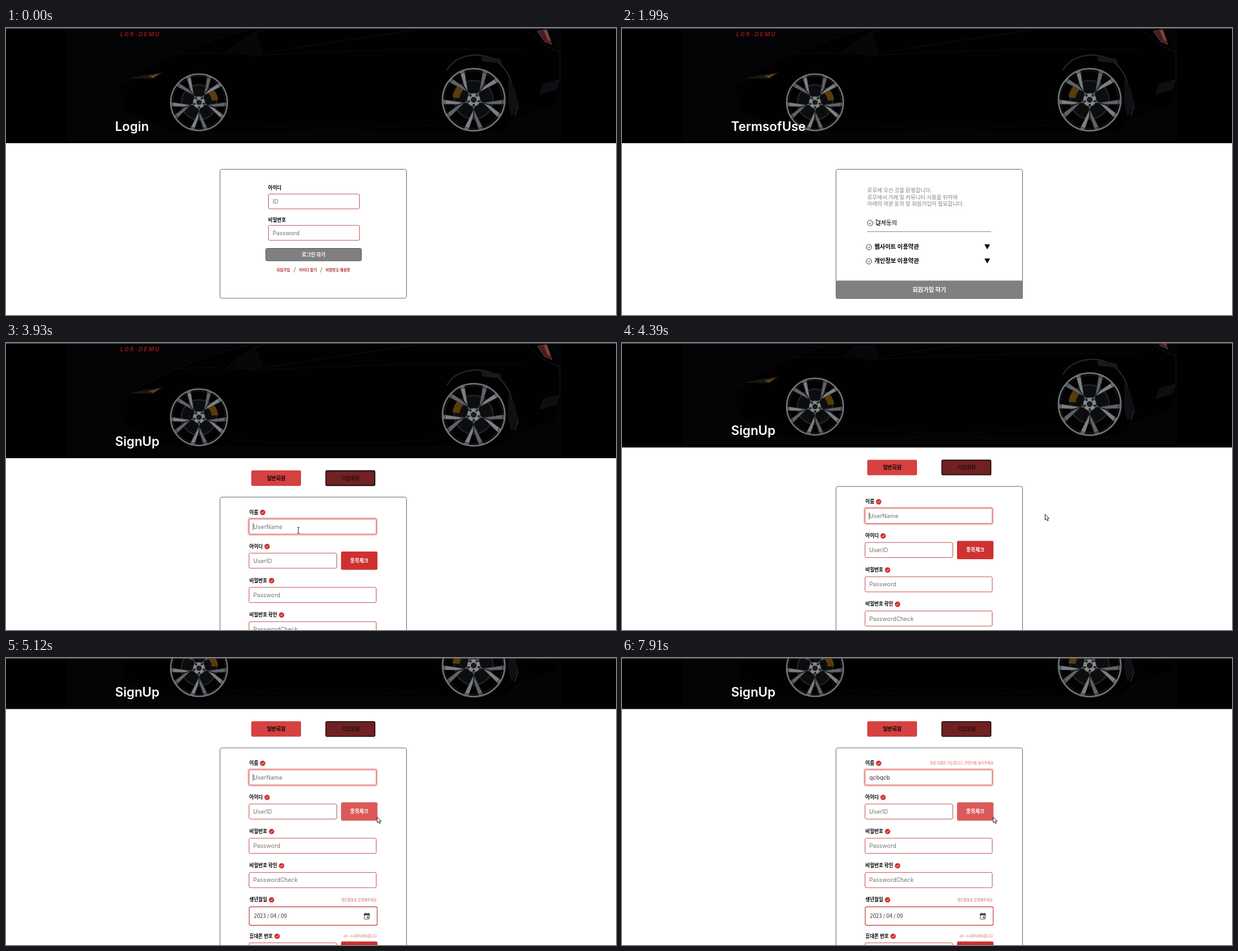
An HTML page with a canvas for the animation above (8000 ms loop, 945 by 446 pixels).

```html
<!DOCTYPE html>
<html lang="ko">
<head>
<meta charset="utf-8">
<title>Sign up flow</title>
<style>
html, body { margin: 0; width: 100%; height: 100%; overflow: hidden; background: #fff; }
canvas { display: block; width: 945px; height: 446px; }
</style>
</head>
<body>
<canvas id="stage" width="945" height="446"></canvas>
<script>
const ctx = document.getElementById('stage').getContext('2d');
const LOOP = 8000, SCROLL = 99.7;
const KR = '"Noto Sans CJK KR", "Noto Sans CJK", sans-serif';
const INTER = 'Inter, "Noto Sans CJK KR", sans-serif';
const RED = '#cf3131', GREY = '#808080', EDGE = '#c9504e', HINT = '#757575';

// Pointer path: time, x, y
const PATH = [
  [250, 637, 398], [720, 446, 372], [910, 446, 371], [1120, 432, 375], [1260, 432, 375],
  [1600, 850, 422], [1990, 394, 297], [2140, 394, 297], [2600, 440, 396], [3130, 440, 396],
  [3560, 449, 250], [3930, 453, 291], [4000, 453, 291], [4530, 697, 261], [4780, 794, 365],
  [5120, 575, 247]
];

// Field contents: time, text, warning visible
const TYPED = [
  [0, '', false], [5980, 'q', true], [6510, '', false], [6970, 'qcb', true],
  [7110, 'qcbq', true], [7310, 'qcbqc', true], [7380, 'qcbqcb', true]
];

const smooth = p => p * p * (3 - 2 * p);
const clamp = p => Math.max(0, Math.min(1, p));
const inside = (p, x0, y0, x1, y1) => p.x >= x0 && p.x <= x1 && p.y >= y0 && p.y <= y1;

function pointer(t) {
  const i = PATH.findIndex(k => k[0] > t);
  if (i === 0) return null;
  if (i < 0) return { x: 575, y: 247 };
  const [t0, x0, y0] = PATH[i - 1], [t1, x1, y1] = PATH[i];
  const p = smooth((t - t0) / (t1 - t0));
  return { x: x0 + (x1 - x0) * p, y: y0 + (y1 - y0) * p };
}

// Text placed by its vertical centre
function text(s, x, cy, size, color = '#000', weight = 700, align = 'left', family = KR) {
  ctx.font = `${weight} ${size}px ${family}`;
  ctx.fillStyle = color;
  ctx.textAlign = align;
  ctx.fillText(s, x, cy + size * 0.37);
  return ctx.measureText(s).width;
}

function box(x0, y0, x1, y1, r, fill, stroke, width = 1) {
  ctx.beginPath();
  ctx.roundRect(x0, y0, x1 - x0, y1 - y0, r);
  if (fill) { ctx.fillStyle = fill; ctx.fill(); }
  if (stroke) { ctx.strokeStyle = stroke; ctx.lineWidth = width; ctx.stroke(); }
}

function shape(points, fill, stroke, width = 1) {
  ctx.beginPath();
  points.forEach(([x, y]) => ctx.lineTo(x, y));
  ctx.closePath();
  if (fill) { ctx.fillStyle = fill; ctx.fill(); }
  if (stroke) { ctx.strokeStyle = stroke; ctx.lineWidth = width; ctx.stroke(); }
}

function curve(d, stroke, width) {
  ctx.strokeStyle = stroke;
  ctx.lineWidth = width;
  ctx.stroke(new Path2D(d));
}

function disc(x, y, r, fill, stroke, width = 1) {
  ctx.beginPath();
  ctx.arc(x, y, r, 0, Math.PI * 2);
  if (fill) { ctx.fillStyle = fill; ctx.fill(); }
  if (stroke) { ctx.strokeStyle = stroke; ctx.lineWidth = width; ctx.stroke(); }
}

function check(x, y, on, r = 4.2) {
  disc(x, y, on ? r + 0.3 : r, on ? RED : null, on ? null : '#222', 0.8);
  curve(`M${x - 2} ${y}l1.4 1.5 2.7-2.9`, on ? '#fff' : '#222', 0.8);
}

function input(x0, y0, x1, y1, hint, focus) {
  if (focus) box(x0 - 1, y0 - 1, x1 + 1, y1 + 1, 3, null, 'rgba(207,49,49,.28)', 3);
  box(x0, y0, x1, y1, 2, '#fff', focus ? '#d4504c' : EDGE, 0.9);
  if (hint) text(hint, x0 + 6.5, (y0 + y1) / 2, 9, HINT, 400, 'left', INTER);
}

function wheel(x, y, r, caliper) {
  const at = (d, a) => [d * r * Math.cos(a), d * r * Math.sin(a)];
  ctx.save();
  ctx.translate(x, y);
  disc(0, 0, r * 1.06, '#020203');
  disc(0, 0, r * 0.6, '#0c0d0f', '#222427', 2);
  ctx.beginPath();
  ctx.arc(0, 0, r * 0.55, caliper - 0.38, caliper + 0.38);
  ctx.strokeStyle = '#5a3b0d';
  ctx.lineWidth = r * 0.22;
  ctx.stroke();
  for (let i = 0; i < 5; i++) {
    const a = Math.PI / 2 + i * Math.PI * 0.4;
    for (const s of [-1, 1]) {
      shape([at(0.16, a - s * 0.5), at(0.5, a + s * 0.19), at(0.94, a + s * 0.32),
        at(0.95, a + s * 0.17), at(0.52, a + s * 0.03), at(0.16, a)],
        s < 0 ? '#606366' : '#7d8083', '#25272a', 0.5);
    }
  }
  disc(0, 0, r * 0.965, null, '#6f7275', r * 0.05);
  disc(0, 0, r * 0.9, null, '#1d1f22', 1);
  disc(0, 0, r * 0.21, '#85888a', '#222', 1);
  for (let i = 0; i < 5; i++) disc(...at(0.16, 0.3 + i * Math.PI * 0.4), r * 0.035, '#17181a');
  disc(0, 0, r * 0.09, '#1a1b1d');
  ctx.restore();
}

function hero(title) {
  ctx.fillStyle = '#000';
  ctx.fillRect(0, 0, 945, 179);
  ctx.fillStyle = '#040407';
  ctx.fillRect(93, 0, 767, 175);
  ctx.fillStyle = '#010102';
  ctx.fill(new Path2D('M176 95Q190 66 262 38Q320 14 372 0H832Q858 20 859 80L850 120 790 140 770 160H250L182 128Z'));
  curve('M180 90Q205 64 262 40Q315 18 372 3', '#111217', 1);
  curve('M262 40Q330 36 388 42Q600 30 800 34', '#0b0c10', 1);
  curve('M344 38Q372 12 402 1', '#14151a', 1.2);
  curve('M402 38Q520 20 640 2', '#0e0f14', 1);
  curve('M345 150Q500 162 670 150', '#0a0a0d', 1);
  curve('M804 0Q838 34 858 36V84', '#17181b', 1);
  shape([[350, 36], [374, 12], [388, 11], [399, 38], [382, 44]], '#07070a');
  shape([[190, 78], [214, 73], [244, 69], [226, 79]], '#191714');
  shape([[221, 75], [239, 70], [228, 78]], '#60430f');
  shape([[823, 5], [837, 2], [846, 26], [834, 21]], '#4a1c1c', '#5a4a4a', 0.7);
  shape([[833, 4], [838, 3], [844, 20], [840, 20]], '#7c4440');
  curve('M683 66Q694 45 724 42Q762 40 780 76L793 122 788 136', '#24262a', 2);
  shape([[736, 44], [766, 48], [768, 55], [738, 52]], '#17191c');
  shape([[778, 80], [787, 92], [794, 118], [783, 138], [778, 118]], '#0f1013');
  shape([[832, 86], [858, 80], [854, 96], [826, 104]], '#0d0e11');
  wheel(299, 115.5, 45.5, -0.5);
  wheel(724.5, 111.5, 50, -2.65);

  ctx.letterSpacing = '1.9px';
  text('LOR-DEMU', 177, 9.6, 8.6, '#7d1512', 'italic 800', 'left', INTER);
  ctx.letterSpacing = '0px';
  text(title, 169, 152.8, 19.6, '#fff', 600, 'left', INTER);
}

function login() {
  hero('Login');
  box(331.5, 219.5, 620.5, 420, 3, null, '#777');
  text('아이디', 406, 248.7, 7.5);
  input(406.5, 258, 547.5, 281, 'ID');
  text('비밀번호', 406, 297.8, 7.5);
  input(406.5, 306.8, 547.5, 330, 'Password');
  box(402.5, 342.5, 550.5, 361.8, 2, GREY, '#5c5c5c');
  text('로그인 하기', 476.5, 352.3, 7.6, '#fff', 700, 'center');
  const link = '#b02a2a';
  text('회원가입', 419, 375.7, 5.7, link);
  text('/', 447.3, 375.3, 8, '#222', 400, 'center');
  text('아이디 찾기', 454, 375.7, 5.7, link);
  text('/', 488.4, 375.3, 8, '#222', 400, 'center');
  text('비밀번호 재설정', 495, 375.7, 5.7, link);
}

function terms(on) {
  hero('TermsofUse');
  box(331.5, 219.5, 620.5, 420.5, 3, null, on ? RED : '#777');
  ['로무에 오신 것을 환영합니다.', '로무에서 거래 및 커뮤니티 사용을 위하여',
    '아래의 약관 동의 및 회원가입이 필요합니다.'].forEach((line, i) =>
    text(line, 380, 252.2 + i * 10.4, 8.35, '#808080', 500));
  check(384.5, 303, on);
  text('전체동의', 393, 302.4, 9, '#000', 500);
  ctx.fillStyle = '#999';
  ctx.fillRect(380, 316, 192, 1);
  ['웹사이트 이용약관', '개인정보 이용약관'].forEach((line, i) => {
    const y = 340 + i * 22;
    check(382.5, y + 0.6, on);
    text(line, 391, y, 9.1);
    shape([[561.5, y - 3.8], [570.2, y - 3.8], [565.8, y + 4]], '#000');
  });
  box(331.5, 392.5, 621, 421, 2, on ? RED : GREY);
  text('회원가입 하기', 476, 406.5, 9.05, '#fff', 700, 'center');
}

function label(s, cy, warning) {
  const w = text(s, 377, cy, 7.5);
  check(377 + w + 6.8, cy + 0.3, true, 3.9);
  if (warning) text(warning, 575.5, cy, 5.3, '#d0605c', 400, 'right');
}

function sideButton(y0, y1, s, hover) {
  box(519, y0, 575.5, y1, 2, hover ? '#db5a59' : RED);
  text(s, 547.2, (y0 + y1) / 2, 7.6, '#fff', 700, 'center');
}

function calendar(x, y) {
  ctx.fillStyle = '#444';
  ctx.fillRect(x - 4.3, y - 4.2, 8.6, 3);
  ctx.fillRect(x - 2.9, y - 5.2, 1, 2);
  ctx.fillRect(x + 1.9, y - 5.2, 1, 2);
  ctx.fillRect(x + 0.3, y + 0.5, 2.4, 2.4);
  box(x - 3.9, y - 3.8, x + 3.9, y + 4.6, 0.8, null, '#444', 0.9);
}

function caretOn(t) {
  if (t < 5980) return (t >= 3880 && t < 4400) || (t >= 4900 && t < 5450);
  return t < 7910;
}

function signUp(t, scroll) {
  const focus = t >= 3880;
  const [, typed, warn] = TYPED.filter(k => k[0] <= t).pop();
  ctx.save();
  ctx.translate(0, -scroll);
  hero('SignUp');
  box(380, 198, 457, 222, 2, '#d64141');
  text('일반회원', 418.5, 210, 7.8, '#000', 700, 'center');
  box(495.5, 198.5, 571.5, 221.5, 2, '#702122', '#0c0505', 1.3);
  text('기업회원', 533.7, 210, 7.6, '#000', 400, 'center');
  box(331.5, 239.5, 620.5, 800, 3, null, '#777');

  label('이름', 263, warn && '한글 이름만 가능합니다. 한영키를 눌러주세요');
  input(376.5, 273.5, 573.5, 297, typed ? '' : 'UserName', focus);
  let end = 382.5;
  if (typed) end = 383.4 + text(typed, 383, 285.3, 9, '#333', 400, 'left', INTER);
  if (focus && caretOn(t)) {
    ctx.fillStyle = '#333';
    ctx.fillRect(end, 279.8, 0.8, 11);
  }

  label('아이디', 316);
  input(376.5, 326.6, 512.5, 350, 'UserID');
  sideButton(324, 352.5, '중복체크', t >= 5080);
  label('비밀번호', 369);
  input(376.5, 379.8, 573.5, 403.4, 'Password');
  label('비밀번호 확인', 422.3);
  input(376.5, 433, 573.5, 456.6, 'PasswordCheck');
  label('생년월일', 475.3, '생년월일을 입력해주세요.');
  box(376.8, 486.4, 575, 515, 2, '#fff', EDGE, 1.2);
  text('2023 / 04 / 09', 384, 501, 8.35, '#333', 400);
  calendar(559, 500.8);
  label('휴대폰 번호', 531.8, '10 ~ 11자리여야합니다.');
  input(376.5, 542.4, 512.5, 566, 'PhoneNumber');
  sideButton(540.3, 568.5, '인증하기');
  ctx.restore();
}

function cursor(p, kind) {
  ctx.save();
  ctx.translate(p.x, p.y);
  if (kind === 'beam') {
    curve('M-1.7-4.5H-.5L0-4 .5-4.5H1.7M0-4V4M-1.7 4.5H-.5L0 4 .5 4.5H1.7', '#222', 0.9);
  } else {
    const outline = new Path2D(kind === 'hand'
      ? 'M-1 .8Q0-.6 1 .8V4.2L4.8 5Q6 5.3 5.8 7L5 11.4H-.4L-3 7.6Q-2.8 6-1 7.2Z'
      : 'M0 0V9L2 7.2 3.5 10.4 5 9.7 3.6 6.6H6.2Z');
    ctx.fillStyle = '#fff';
    ctx.fill(outline);
    ctx.strokeStyle = '#222';
    ctx.lineWidth = 0.9;
    ctx.stroke(outline);
  }
  ctx.restore();
}

function cursorKind(t, p, scroll) {
  if (t < 1260) return inside(p, 419, 370, 440, 381) ? 'hand' : 'arrow';
  if (t < 2870) return inside(p, 332, 393, 621, 421) ? 'hand' : 'arrow';
  const q = { x: p.x, y: p.y + scroll };
  const overField = inside(q, 376, 273, 574, 297) || inside(q, 376, 326, 513, 350) ||
    inside(q, 376, 379, 574, 404);
  return overField ? 'beam' : 'arrow';
}

function draw(t) {
  const scroll = SCROLL * smooth(clamp((t - 4255) / 525));
  ctx.fillStyle = '#fff';
  ctx.fillRect(0, 0, 945, 446);
  if (t < 1260) login();
  else if (t < 2870) terms(t >= 2140);
  else signUp(t, scroll);
  ctx.fillStyle = '#5c5c5c';
  ctx.fillRect(0, 0, 945, 1);
  const p = pointer(t);
  if (p) cursor(p, cursorKind(t, p, scroll));
}

const start = performance.now();
function tick() {
  draw((performance.now() - start) % LOOP);
  requestAnimationFrame(tick);
}
tick();
</script>
</body>
</html>
```
